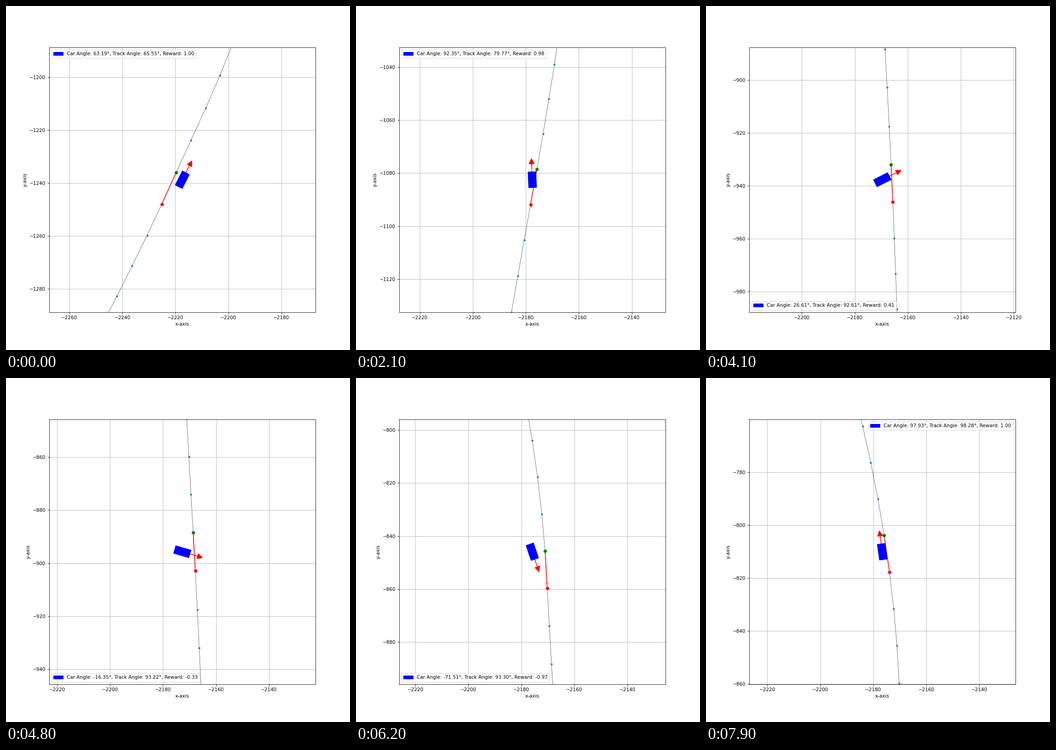
A matplotlib script that plays this animation: 748x748 px, repeating every 8000 ms.

```python
import numpy as np
import matplotlib.pyplot as plt
from matplotlib.animation import FuncAnimation
from matplotlib.patches import Rectangle
from matplotlib.ticker import MultipleLocator

FRAMES, STEP = 80, 100
VIEW = 50                      # half height of the window around the car
CAR_LENGTH, CAR_WIDTH = 6, 3

# The car drives along the track, skids into a clockwise spin and recovers
TIMES = np.array([0, 0.9, 2.1, 3.3, 4.8, 6.2, 7.9])
CAR_X = [-2217.39, -2190.49, -2177.56, -2168.20, -2172.72, -2175.88, -2176.61]
CAR_Y = [-1238.74, -1173.95, -1082.50, -994.00, -895.70, -845.94, -810.07]
CAR_ANGLE = [63.19, 72.76, 92.35, 71.40, -16.35, -71.51, -262.07]


def build_track(start, count):
    """Chain straight pieces whose direction and length change gradually."""
    n = np.arange(1, count + 1)
    angle = np.radians(np.interp(
        n, [1, 5, 7, 9, 11, 13, 17, 21, 23, 24, 25, 31, 34, 37, 41],
        [62.5, 65.55, 65.2, 68, 76.66, 80.1, 79.77, 81.3, 84.1, 89.63, 92,
         93.22, 93.3, 98.28, 104]))
    length = np.interp(n, [2, 12, 22, 26, 30, 35],
                       [12.75, 14.05, 13.08, 13.45, 14.7, 14])
    pieces = length[:, None] * np.column_stack([np.cos(angle), np.sin(angle)])
    return np.vstack([start, start + np.cumsum(pieces, axis=0)])


def smooth(t, values):
    """Cubic curve through the values at TIMES."""
    rates = np.gradient(values, TIMES)
    i = min(np.searchsorted(TIMES, t, "right"), len(TIMES) - 1) - 1
    h = TIMES[i + 1] - TIMES[i]
    u = (t - TIMES[i]) / h
    return ((1 + 2 * u) * (1 - u) ** 2 * values[i]
            + u * (1 - u) ** 2 * h * rates[i]
            + u * u * (3 - 2 * u) * values[i + 1]
            + u * u * (u - 1) * h * rates[i + 1])


def current_segment(car):
    """Index of the last track point the car has passed."""
    along = np.diff(TRACK, axis=0)
    along /= np.hypot(*along.T)[:, None]
    passed = ((car - TRACK[:-1]) * along).sum(axis=1) > 0.3
    return int(np.flatnonzero(passed)[-1])


TRACK = build_track(np.array([-2247.95, -1294.0]), 41)
fig = plt.figure(figsize=(10, 10), dpi=74.8)
ax = fig.add_subplot()


def draw(frame):
    ax.clear()
    t = frame * STEP / 1000
    x, y, angle = (smooth(t, v) for v in (CAR_X, CAR_Y, CAR_ANGLE))
    angle = (angle + 180) % 360 - 180
    i = current_segment(np.array([x, y]))
    start, end = TRACK[i], TRACK[i + 1]
    dx, dy = end - start
    track_angle = np.degrees(np.arctan2(dy, dx))
    reward = np.cos(np.radians(track_angle - angle))

    ax.plot(*TRACK.T, "k-", lw=0.5, marker="o", ms=3, mfc="C0", mec="C0")
    ax.plot(*TRACK[i:i + 2].T, "r-", lw=1.5)
    ax.plot(*start, "ro")
    ax.plot(*end, "go")

    a = np.radians(angle)
    ax.arrow(x, y, 6 * np.cos(a), 6 * np.sin(a), head_width=2, head_length=2,
             fc="red", ec="red", zorder=2.5)
    label = (f"Car Angle: {angle:.2f}°, Track Angle: {track_angle:.2f}°, "
             f"Reward: {reward:.2f}")
    ax.add_patch(Rectangle((x - CAR_LENGTH / 2, y - CAR_WIDTH / 2),
                           CAR_LENGTH, CAR_WIDTH, angle=angle,
                           rotation_point="center", color="blue",
                           zorder=4, label=label))

    box = ax.get_position()
    half = VIEW * box.width / box.height
    ax.set(xlim=(x - half, x + half), ylim=(y - VIEW, y + VIEW),
           xlabel="x-axis", ylabel="y-axis")
    for axis in (ax.xaxis, ax.yaxis):
        axis.set_major_locator(MultipleLocator(20))
    ax.grid(True)
    ax.legend(loc="best")


anim = FuncAnimation(fig, draw, frames=FRAMES, interval=STEP,
                     init_func=lambda: None, repeat=True, repeat_delay=0)
plt.show()
```
